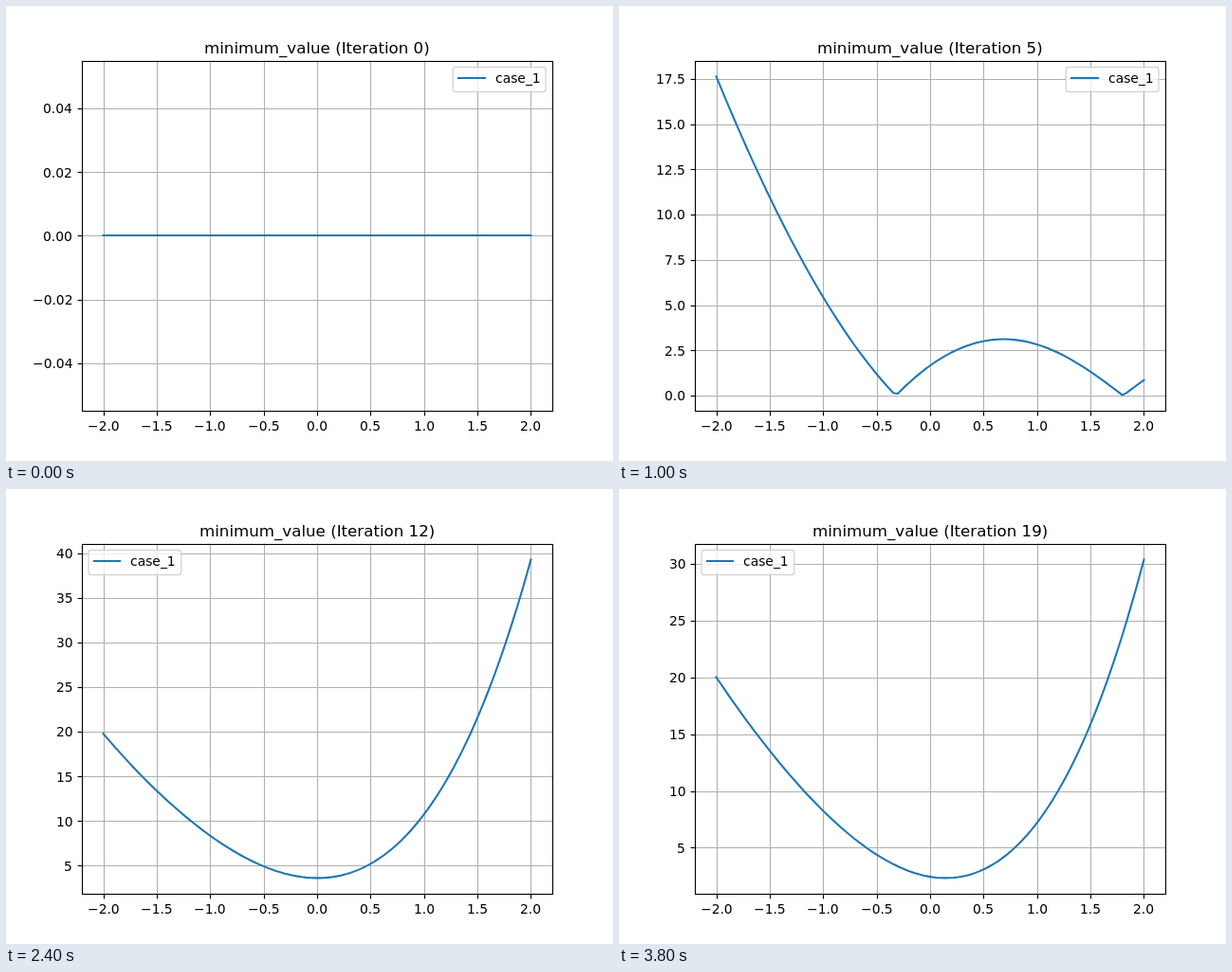
Write an HTML page with a canvas that moves like this. It is 640x480 px and loops after 4 s.

```html
<!DOCTYPE html>
<html lang="en">
<head>
<meta charset="utf-8">
<title>minimum_value</title>
<style>
  html, body { margin: 0; width: 100%; height: 100%; overflow: hidden; background: #fff; }
  canvas { display: block; width: 640px; height: 480px; }
</style>
</head>
<body>
<canvas id="plot" width="640" height="480"></canvas>
<script>
const ctx = document.getElementById('plot').getContext('2d');
const STEP_MS = 200;
const ITERATIONS = 20;
const SAMPLES = 100;
const BOX = { left: 80, top: 57.6, right: 576, bottom: 427.2 };
const LEGEND = { width: 97.8, height: 25.9, pad: 6.94 };
const FONT = '"DejaVu Sans", Verdana, sans-serif';
const BLUE = '#1f77b4';
const GRID = '#b0b0b0';

const poly = (...coeffs) => x => coeffs.reduceRight((sum, c) => sum * x + c, 0);
const withRoots = (a, b, rest) => x => (x - a) * (x - b) * rest(x);

// Quartic through values at x = -2, -1, 0, 1, 2 (Newton forward differences).
const through = (...values) => x => {
  let diffs = values, weight = 1, sum = 0;
  for (let k = 0; k < values.length; k++) {
    sum += weight * diffs[0];
    weight *= (x + 2 - k) / (k + 1);
    diffs = diffs.slice(1).map((v, i) => v - diffs[i]);
  }
  return sum;
};

// Key curves by iteration; the ones between are blended.
const keys = [
  [0, poly(0)],
  [1, through(2.2, -1.2, 0.4, 7.2, 19.2)],
  [3, withRoots(-0.93, -0.2, poly(3.07, -0.3485, 0.004, 0.0185))],
  [5, withRoots(-0.32, 1.805, poly(2.87, -0.0553, -0.108, -0.0397, -0.0068))],
  [7, through(9, 4, 1.6, 5.8, 24)],
  [8, through(12.06, 5.95, 3.09, 8, 28.75)],
  [9, through(17, 8.2, 5.05, 11, 36.5)],
  [12, through(19.8, 8.36, 3.61, 10.75, 39.32)],
  [15, through(20.1, 8.58, 3.22, 9.4, 36.1)],
  [18, through(18.5, 7.9, 2.95, 6.5, 22.5)],
  [19, through(20.02, 8.25, 2.45, 7.2, 30.38)]
];

function curveAt(iteration) {
  const next = Math.max(1, keys.findIndex(([at]) => at >= iteration));
  const [a, f] = keys[next - 1], [b, g] = keys[next];
  const mix = (iteration - a) / (b - a);
  return x => Math.abs((1 - mix) * f(x) + mix * g(x));
}

function tickStep(span) {
  const raw = span / 9;
  const power = 10 ** Math.floor(Math.log10(raw));
  return power * [1, 2, 2.5, 5, 10].find(m => m * power >= raw);
}

const xPos = x => BOX.left + (x + 2.2) / 4.4 * (BOX.right - BOX.left);
const snap = v => Math.floor(v + 0.5) + 0.5;
const format = (value, digits) => value.toFixed(digits).replace('-', '\u2212');

function makePlot(iteration) {
  const f = curveAt(iteration);
  const xs = Array.from({ length: SAMPLES }, (_, i) => -2 + 4 * i / (SAMPLES - 1));
  const ys = xs.map(f);
  let low = Math.min(...ys), high = Math.max(...ys);
  const flat = high === low;
  if (flat) { low -= 0.05; high += 0.05; }
  const margin = (high - low) * 0.05;
  low -= margin;
  high += margin;
  const yPos = y => BOX.bottom - (y - low) / (high - low) * (BOX.bottom - BOX.top);

  const step = tickStep(high - low);
  const digits = step < 1 ? 2 : step % 1 ? 1 : 0;
  const ticks = [];
  for (let k = Math.ceil(low / step); k * step <= high; k++) {
    ticks.push({ y: yPos(k * step), label: format(k * step, digits) });
  }

  const points = xs.map((x, i) => [xPos(x), flat ? Math.round(yPos(ys[i])) : yPos(ys[i])]);
  const { width, height, pad } = LEGEND;
  const legendRight = BOX.right - pad - width;
  const crowded = points.some(([x, y]) => x > legendRight && y < BOX.top + pad + height);
  return { points, ticks, legendX: crowded ? BOX.left + pad : legendRight };
}

function line(x1, y1, x2, y2, color, width = 1.11) {
  ctx.beginPath();
  ctx.moveTo(x1, y1);
  ctx.lineTo(x2, y2);
  ctx.strokeStyle = color;
  ctx.lineWidth = width;
  ctx.stroke();
}

// anchor: 0 = left, 0.5 = centre, 1 = right; the ink starts on a whole pixel.
function text(str, x, y, anchor, size = 13.89) {
  ctx.font = `${size}px ${FONT}`;
  ctx.fillStyle = '#000';
  const { width, actualBoundingBoxLeft } = ctx.measureText(str);
  const ink = Math.round(x - width * anchor - actualBoundingBoxLeft);
  ctx.fillText(str, ink + actualBoundingBoxLeft, y);
}

function drawLegend(x) {
  const y = BOX.top + LEGEND.pad;
  ctx.beginPath();
  ctx.roundRect(x, y, LEGEND.width, LEGEND.height, 2.8);
  ctx.fillStyle = 'rgba(255,255,255,0.8)';
  ctx.fill();
  ctx.strokeStyle = 'rgba(204,204,204,0.8)';
  ctx.lineWidth = 1.39;
  ctx.stroke();
  ctx.lineCap = 'square';
  line(Math.round(x + 5.56), 76, Math.round(x + 33.3), 76, BLUE, 2.08);
  text('case_1', x + 44.4, 81, 0);
}

function draw(iteration) {
  const { points, ticks, legendX } = makePlot(iteration);
  ctx.fillStyle = '#fff';
  ctx.fillRect(0, 0, 640, 480);
  ctx.lineCap = 'butt';

  for (let i = -4; i <= 4; i++) {
    const x = xPos(i / 2);
    line(snap(x), BOX.top, snap(x), BOX.bottom, GRID);
    line(snap(x), 427.5, snap(x), 432.4, '#000');
    text(format(i / 2, 1), x, 448, 0.5);
  }
  for (const { y, label } of ticks) {
    line(BOX.left, snap(y), BOX.right, snap(y), GRID);
    line(75.6, snap(y), 80.5, snap(y), '#000');
    text(label, 70.3, Math.round(y + 5.3), 1);
  }

  ctx.beginPath();
  points.forEach(([x, y]) => ctx.lineTo(x, y));
  ctx.strokeStyle = BLUE;
  ctx.lineWidth = 2.08;
  ctx.lineJoin = 'round';
  ctx.lineCap = 'square';
  ctx.stroke();

  ctx.lineJoin = 'miter';
  ctx.strokeStyle = '#000';
  ctx.lineWidth = 1.11;
  ctx.strokeRect(80.5, 58.5, 496, 369);

  text(`minimum_value (Iteration ${iteration})`, 328, 50, 0.5, 16.67);
  drawLegend(legendX);
}

let shown = 0;
function tick(now) {
  const iteration = Math.floor(now / STEP_MS) % ITERATIONS;
  if (iteration !== shown) draw(shown = iteration);
  requestAnimationFrame(tick);
}
draw(0);
requestAnimationFrame(tick);
</script>
</body>
</html>
```
